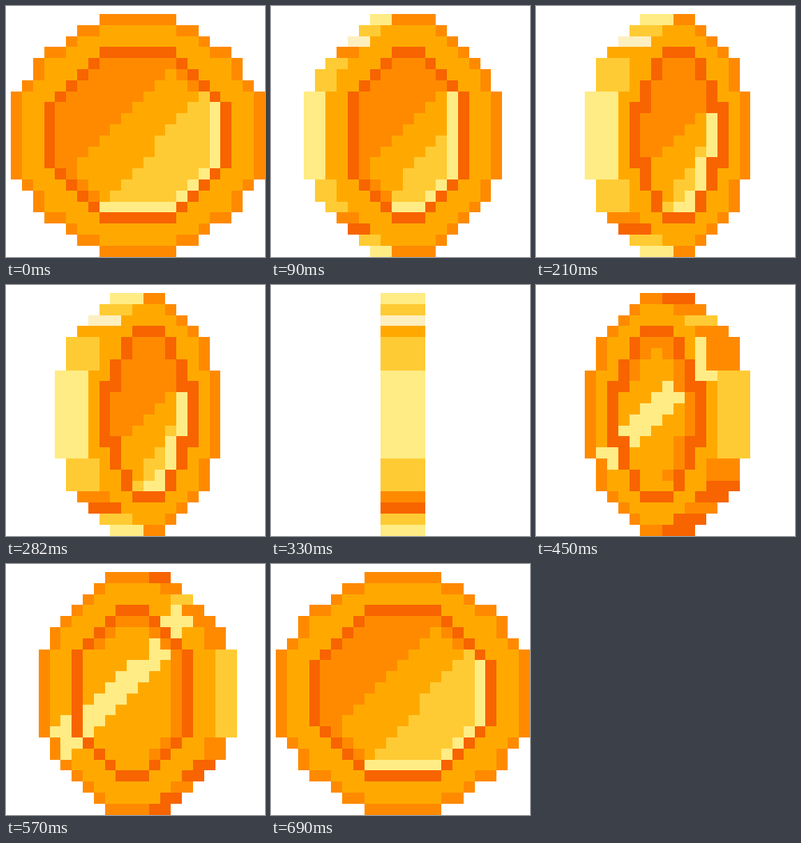
Write an HTML page with a canvas that moves like this. It is 324 by 314 pixels and loops after 780 ms.

```html
<!DOCTYPE html>
<html lang="en">
<head>
<meta charset="utf-8">
<title>Spinning coin</title>
<style>
  html, body { margin: 0; width: 100%; height: 100%; overflow: hidden; background: #fff; }
  canvas { display: block; }
</style>
</head>
<body>
<canvas id="stage" width="324" height="314"></canvas>
<script>
const ctx = document.getElementById('stage').getContext('2d');
const CELL = 13.8, ROWS = 22, LOOP = 780, STEP = 120;
const DARK = '#f76400', ORANGE = '#ff8a00', GOLD = '#ffa900',
      LIGHT = '#ffcb34', PALE = '#ffec85', CREAM = '#fdefbf';

let shift = 0; // left column of the current pose

const px = col => Math.round(6.2 + CELL * (col + shift));
const py = row => Math.round(10 + CELL * row);

function put(color, row, col, width = 1, height = 1) {
  if (width <= 0) return;
  ctx.fillStyle = color;
  ctx.fillRect(px(col), py(row), px(col + width) - px(col), py(row + height) - py(row));
}

// A stepped oval, symmetric both ways; insets run from its top row to the middle.
function oval(x, width, top, insets) {
  const inset = r => insets[Math.min(Math.min(r, ROWS - 1 - r) - top, insets.length - 1)];
  const left = r => x + inset(r);
  const right = r => x + width - inset(r);
  const fill = color => {
    for (let r = top; r < ROWS - top; r++) put(color, r, left(r), right(r) - left(r));
  };
  return { left, right, fill };
}

// Diagonal facet inside an oval: its left edge moves one column per row.
function slant(color, shape, sum, top, bottom, width = 99) {
  for (let r = top; r <= bottom; r++) {
    const from = Math.max(sum - r, shape.left(r));
    put(color, r, from, Math.min(sum - r + width, shape.right(r)) - from);
  }
}

// The coin's thick side: [colour, number of rows] from top to bottom.
const litSide = row3 => [[PALE, 1], [LIGHT, 1], [CREAM, 1], [row3, 1], [LIGHT, 3], [PALE, 8],
  [LIGHT, 3], [ORANGE, 1], [DARK, 1], [LIGHT, 1], [PALE, 1]];
const shadedSide = [[DARK, 1], [ORANGE, 1], [LIGHT, 1], [ORANGE, 4], [LIGHT, 8],
  [ORANGE, 2], [DARK, 2], [ORANGE, 1], [DARK, 2]];

function side(bands, width, column) {
  let row = 0;
  for (const [color, count] of bands)
    for (let i = 0; i < count; i++, row++) put(color, row, column(row), width);
}

function coin(width, rimInsets, faceInsets) {
  shift = (23 - width) / 2;
  const rim = oval(0, width, 0, rimInsets);
  rim.fill(ORANGE);
  oval(1, width - 2, 1, faceInsets).fill(GOLD);
  return rim;
}

function hollow(x, width, ringInsets, wellInsets) {
  oval(x, width, 3, ringInsets).fill(DARK);
  const well = oval(x + 1, width - 2, 4, wellInsets);
  well.fill(ORANGE);
  return well;
}

const threeQuarter = () => coin(18, [6, 5, 4, 3, 2, 1, 1, 0], [5, 4, 3, 2, 1, 1, 0]);
const narrow = () => coin(15, [5, 4, 3, 2, 1, 1, 1, 0], [4, 3, 2, 1, 1, 1, 0]);
const threeQuarterWell = x => hollow(x, 11, [4, 3, 2, 1, 0], [3, 2, 1, 0]);
const narrowWell = x => hollow(x, 9, [3, 2, 2, 1, 1, 0], [2, 2, 1, 1, 1, 0]);

// Bright lower right lip of the well.
function lip(well, top) {
  for (let r = top; r < 17; r++) put(PALE, r, well.right(r) - 1);
  put(PALE, 17, 8, well.right(17) - 8);
}

function shadeCorner(well) {
  for (let r = 14; r < 17; r++) put(ORANGE, r, well.left(r));
}

// Back of the coin: gold well, shaded along the top and right.
function backWell(well, shadedTo) {
  for (let r = 5; r < 18; r++) {
    const from = well.left(r) + (r <= shadedTo ? 1 : 0);
    put(GOLD, r, from, well.right(r) - from - (r < 17 ? 1 : 0));
  }
}

const poses = [
  function front() {
    coin(23, [8, 6, 5, 3, 2, 2, 1, 0], [7, 5, 4, 2, 2, 1, 0]);
    const well = hollow(3, 17, [5, 4, 3, 2, 1, 0], [4, 3, 2, 1, 0]);
    slant(GOLD, well, 19, 5, 16);
    put(ORANGE, 5, 15);
    put(ORANGE, 6, 16);
    slant(LIGHT, well, 24, 7, 11);
    slant(LIGHT, well, 25, 12, 16);
    shadeCorner(well);
    lip(well, 8);
  },
  function turning() {
    const rim = threeQuarter();
    side(litSide(ORANGE), 2, rim.left);
    const well = threeQuarterWell(4);
    slant(GOLD, well, 19, 7, 16);
    slant(LIGHT, well, 23, 11, 14);
    slant(LIGHT, well, 24, 15, 16);
    shadeCorner(well);
    lip(well, 7);
  },
  function nearlyEdge() {
    const rim = narrow();
    side(litSide(GOLD), 3, rim.left);
    const well = narrowWell(4);
    slant(GOLD, well, 19, 9, 17);
    slant(LIGHT, well, 22, 12, 12);
    slant(LIGHT, well, 23, 13, 15);
    slant(LIGHT, well, 24, 16, 17);
    lip(well, 9);
  },
  function edge() {
    shift = 9.5;
    side(litSide(GOLD), 4, () => 0);
  },
  function backNarrow() {
    const rim = narrow();
    side(shadedSide, 3, r => rim.right(r) - 3);
    const well = narrowWell(2);
    backWell(well, 7);
    put(PALE, 8, 7);
    slant(PALE, well, 15, 9, 12, 3);
    put(PALE, 13, 4);
    put(PALE, 4, 10, 1, 3);
    put(PALE, 7, 10, 2);
    put(PALE, 14, 1, 2);
    put(PALE, 15, 2);
  },
  function backTurning() {
    const rim = threeQuarter();
    side(shadedSide, 2, r => rim.right(r) - 2);
    const well = threeQuarterWell(3);
    backWell(well, 6);
    put(PALE, 6, 10);
    put(PALE, 7, 10, 2);
    slant(PALE, well, 16, 8, 14, 3);
    put(PALE, 3, 12, 1, 3);
    put(PALE, 4, 11, 3);
    put(PALE, 13, 2, 1, 4);
    put(PALE, 14, 1, 2);
    put(PALE, 15, 2, 2);
  }
];

function draw(now) {
  const step = Math.floor((now % LOOP + 30) / STEP) % poses.length;
  ctx.clearRect(0, 0, 324, 314);
  poses[step]();
}

const start = performance.now();
function tick() {
  draw(performance.now() - start);
  requestAnimationFrame(tick);
}
tick();
</script>
</body>
</html>
```
